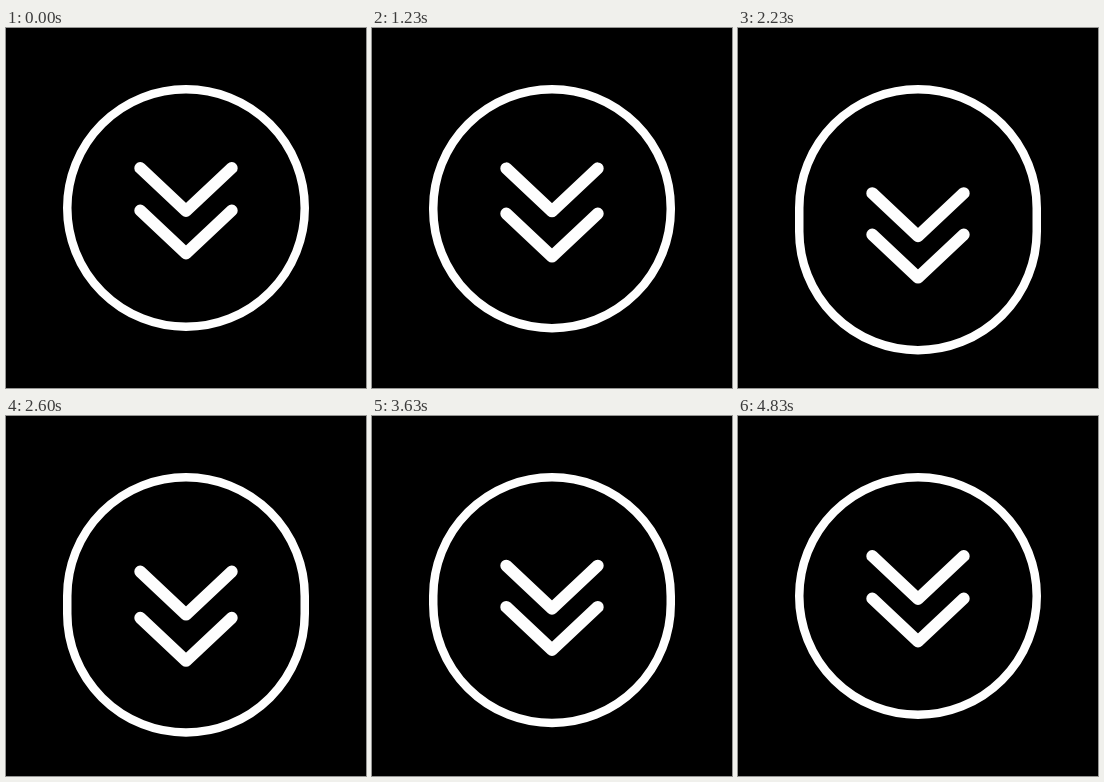
These frames come from a looping animation (360 by 360 pixels, 5110 ms). An HTML page:

```html
<!DOCTYPE html>
<html lang="en">
<head>
<meta charset="utf-8">
<title>Scroll down</title>
<style>
  html, body { margin: 0; width: 100%; height: 100%; overflow: hidden; background: #000; }
  svg { display: block; width: 100%; height: 100%; }
</style>
</head>
<body>
<svg viewBox="0 0 360 360" fill="none" stroke="#fefefe" stroke-linecap="round" stroke-linejoin="round">
  <rect id="ring" x="61.25" y="61.25" width="237.5" height="237.5" rx="118.75" stroke-width="8.5"/>
  <path id="upper" d="M134.3 140 L180 183 L225.7 140" stroke-width="12"/>
  <path id="lower" d="M134.3 182.5 L180 225.5 L225.7 182.5" stroke-width="12"/>
</svg>
<script>
const LOOP = 5110, CYCLE = 1700;
const [ring, upper, lower] = ['ring', 'upper', 'lower'].map(id => document.getElementById(id));

const ease = x => {
  x = Math.min(1, Math.max(0, x));
  return x * x * (3 - 2 * x);
};

// Drop until `peak`, then return to rest at `end` (ms).
const drop = (t, peak, end, distance) =>
  distance * (t < peak ? ease(t / peak) : ease((end - t) / (end - peak)));

// Poses are 50 ms apart, shown for 30 and 70 ms in turn.
const poseTime = t => Math.floor(t / 100) * 100 + (t % 100 >= 30 ? 50 : 0);

function draw(now) {
  const t = poseTime(now % LOOP % CYCLE);
  ring.setAttribute('height', 237.5 + drop(t, 650, 1350, 25));
  upper.setAttribute('transform', `translate(0 ${drop(t, 600, 1300, 25.7)})`);
  lower.setAttribute('transform', `translate(0 ${drop(t, 650, 1415, 25.7)})`);
}

const start = performance.now();
function tick() {
  draw(performance.now() - start);
  requestAnimationFrame(tick);
}
tick();
</script>
</body>
</html>
```
